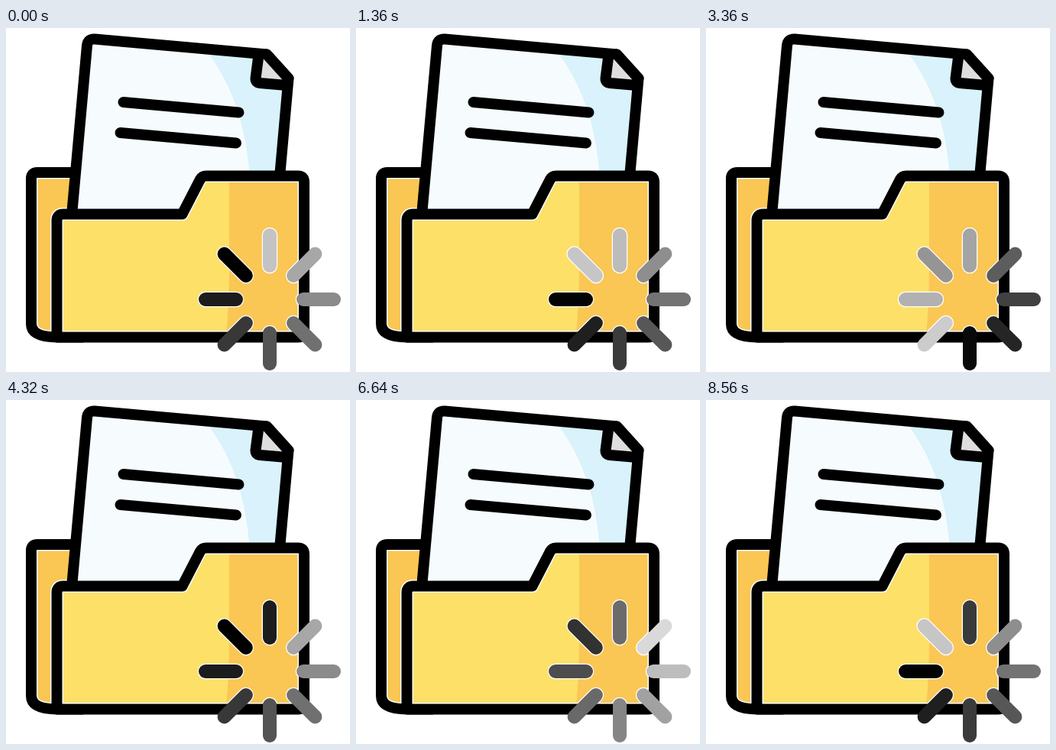
Recreate the animation shown at these times as an HTML page. Size 450 by 450 pixels, loop 8640 ms.

```html
<!DOCTYPE html>
<html lang="en">
<head>
<meta charset="utf-8">
<title>Loading folder</title>
<style>
  html, body { margin: 0; width: 100%; height: 100%; overflow: hidden; background: #fff; }
  svg { display: block; width: 100%; height: 100%; }
  .ink { fill: none; stroke: #000; stroke-width: 14; stroke-linecap: round; stroke-linejoin: round; }
  .rim { fill: none; stroke: #fff; stroke-width: 17; stroke-linejoin: round; }
</style>
</head>
<body>
<svg viewBox="0 0 450 450">
  <defs>
    <path id="back" d="M100 189H41Q33 189 33 197V387C33 400 46 404.500 68 404.500H100"/>
    <path id="sheet" d="M86 245L106 23Q107 14 116 14.500L341 34.500L369.500 66L358 195V245Z"/>
    <path id="front" d="M66.500 404.500V252Q66.500 243.500 75 243.500H230.500L254 198Q256.500 193.500 262 193.500H382Q390 193.500 390 201.500V397Q390 404.500 382 404.500Z"/>
    <clipPath id="sheetClip"><use href="#sheet"/></clipPath>
    <clipPath id="frontClip"><use href="#front"/></clipPath>
  </defs>

  <use href="#back" fill="#fac654"/>
  <use href="#back" class="rim"/>
  <use href="#front" class="rim"/>
  <use href="#back" class="ink"/>

  <use href="#sheet" fill="#f6fcfe"/>
  <path d="M254 20Q313 88 319 200H400V20Z" fill="#d9f2fb" clip-path="url(#sheetClip)"/>
  <use href="#sheet" class="ink"/>
  <path d="M332 34L327 66Q327 71.500 333 72L369 75V66L341 34Z" fill="#dedede"/>
  <path class="ink" d="M330.500 35L326.500 66Q326.500 71.500 332 72L367 75M341 34.500L369.500 66"/>
  <path class="ink" d="M153.500 97L304.500 110.500M149.500 137L301 150.500"/>

  <use href="#front" fill="#fde068"/>
  <path d="M292 190H395V410H287Q292 365 292 310Z" fill="#fac654" clip-path="url(#frontClip)"/>
  <use href="#front" class="rim" clip-path="url(#frontClip)"/>
  <g id="halos" transform="translate(345 355)" stroke-linecap="round"></g>
  <use href="#front" class="ink"/>
  <g id="spinner" transform="translate(345 355)" stroke-linecap="round"></g>
</svg>
<script>
  const FRAME = 80, LOOP = 8640, SPOKES = 8, LIGHTEST = 223;

  function addSpoke(parentId, index, width, color) {
    const line = document.createElementNS('http://www.w3.org/2000/svg', 'line');
    const attrs = {
      y1: -44, y2: -84, stroke: color, 'stroke-width': width,
      transform: `rotate(${index * 360 / SPOKES})`
    };
    for (const key in attrs) line.setAttribute(key, attrs[key]);
    return document.getElementById(parentId).appendChild(line);
  }

  const spokes = Array.from({ length: SPOKES }, (_, i) => {
    addSpoke('halos', i, 20.5, '#fff');
    return addSpoke('spinner', i, 18, '#000');
  });

  // The top spoke runs slightly faster than the other seven.
  const cycles = i => i === 0 ? 12.5 : 12;

  function draw(ms) {
    const time = Math.floor(ms % LOOP / FRAME) * FRAME / LOOP;
    spokes.forEach((spoke, i) => {
      const phase = (time * cycles(i) + (SPOKES - 1 - i) / SPOKES + 1e-6) % 1;
      const v = Math.round(phase * LIGHTEST);
      spoke.setAttribute('stroke', `rgb(${v},${v},${v})`);
    });
  }

  const start = performance.now();
  function tick() {
    draw(performance.now() - start);
    requestAnimationFrame(tick);
  }
  tick();
</script>
</body>
</html>
```
